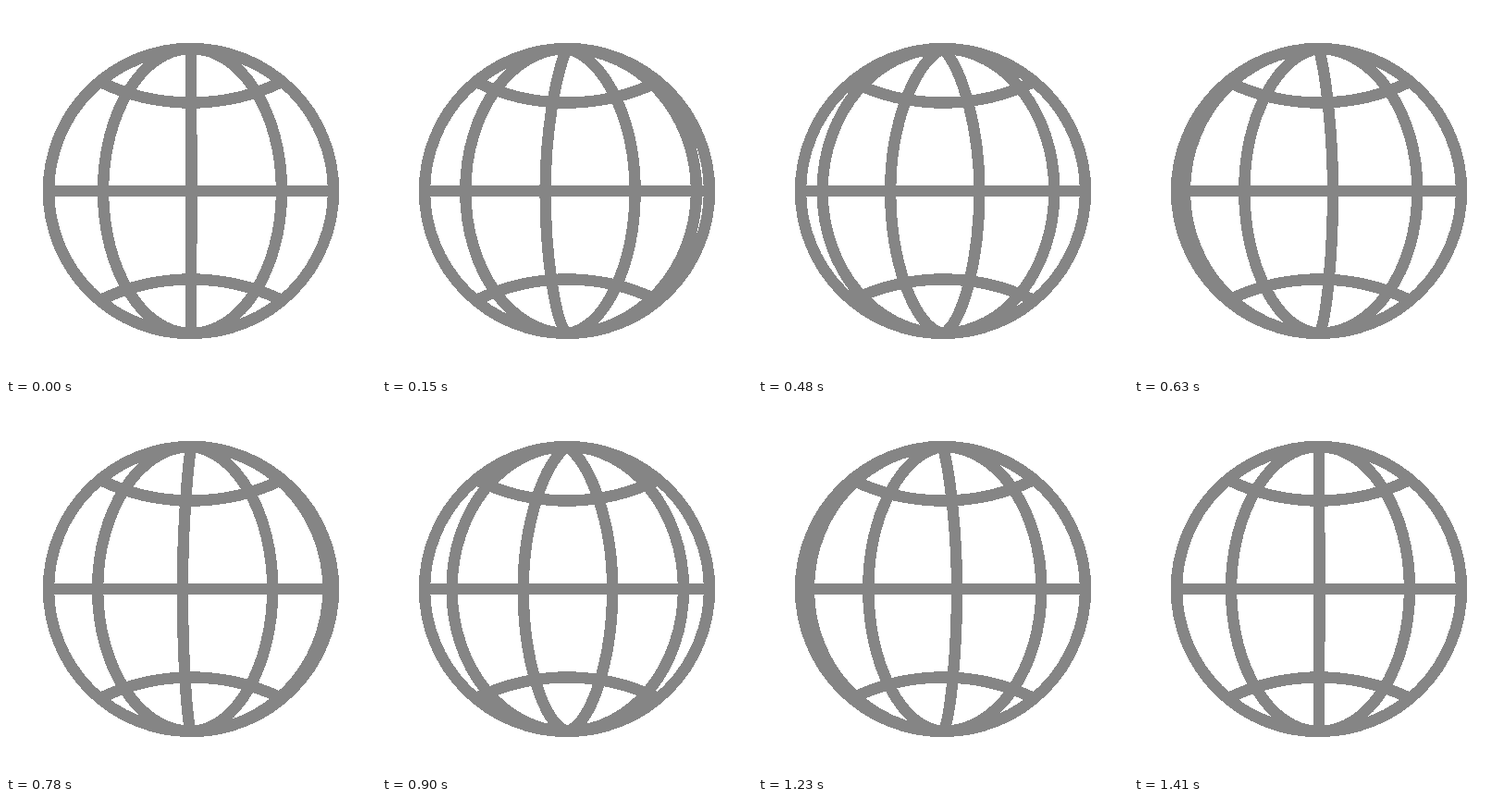
An HTML page with a canvas that plays this animation: 400 px wide and 400 px high, repeating every 1.44 s.

```html
<!DOCTYPE html>
<html lang="en">
<head>
<meta charset="utf-8">
<title>Spinning globe</title>
<style>
  html, body { margin: 0; width: 100%; height: 100%; overflow: hidden; background: #fff; }
  canvas { display: block; width: 400px; height: 400px; }
</style>
</head>
<body>
<canvas id="stage" width="400" height="400"></canvas>
<script>
const ctx = document.getElementById('stage').getContext('2d', { willReadFrequently: true });
const LOOP = 1440, STEP = 30, SPIN_END = 1400, TURN = 200;
const R = 154, KAPPA = 0.5523;

// Curve handles as fractions of the radius, for the upper and lower half.
const ellipse = { top: [1, KAPPA], bottom: [1, KAPPA] };
const line = { top: [0.75, 1 / 3], bottom: [0.9, 0.4] };

const stops = [
  { x: -R, shape: ellipse },
  { x: -95, shape: ellipse },
  { x: 0.4, shape: line },
  { x: 98, shape: ellipse },
  { x: R, shape: ellipse }
];

const mix = (a, b, s) => a + (b - a) * s;

function meridian(from, to, s) {
  const x = mix(from.x, to.x, s);
  const handles = half => from.shape[half].map((h, i) => R * mix(h, to.shape[half][i], s));
  const [topPole, topEquator] = handles('top');
  const [bottomPole, bottomEquator] = handles('bottom');
  ctx.beginPath();
  ctx.moveTo(0, -R);
  ctx.bezierCurveTo(KAPPA * x, -topPole, x, -topEquator, x, 0);
  ctx.bezierCurveTo(x, bottomEquator, KAPPA * x, bottomPole, 0, R);
  ctx.stroke();
}

function parallel(side) {
  const radius = 225, half = Math.asin(98 / radius);
  const middle = -side * Math.PI / 2;
  ctx.beginPath();
  ctx.arc(0, side * (95.5 + radius), radius, middle - half, middle + half);
  ctx.stroke();
}

// Turns soft edges into hard pixel steps.
function hardenEdges() {
  const image = ctx.getImageData(0, 0, 400, 400);
  const pixels = new Uint32Array(image.data.buffer);
  for (let i = 0; i < pixels.length; i++) {
    pixels[i] = (pixels[i] >>> 24) > 80 ? 0xff858585 : 0;
  }
  ctx.putImageData(image, 0, 0);
}

function draw(time) {
  const phase = Math.min(time, SPIN_END) / TURN % 1;
  ctx.setTransform(1, 0, 0, 1, 0, 0);
  ctx.clearRect(0, 0, 400, 400);
  ctx.translate(200, 200);
  ctx.strokeStyle = '#858585';
  ctx.lineWidth = 12;

  ctx.beginPath();
  ctx.arc(0, 0, R, 0, 2 * Math.PI);
  ctx.moveTo(-R, 0);
  ctx.lineTo(R, 0);
  ctx.stroke();
  parallel(-1);
  parallel(1);
  for (let i = 0; i < stops.length - 1; i++) meridian(stops[i], stops[i + 1], phase);
  hardenEdges();
}

const start = performance.now();
function tick() {
  const time = (performance.now() - start) % LOOP;
  draw(Math.floor(time / STEP) * STEP);
  requestAnimationFrame(tick);
}
tick();
</script>
</body>
</html>
```
